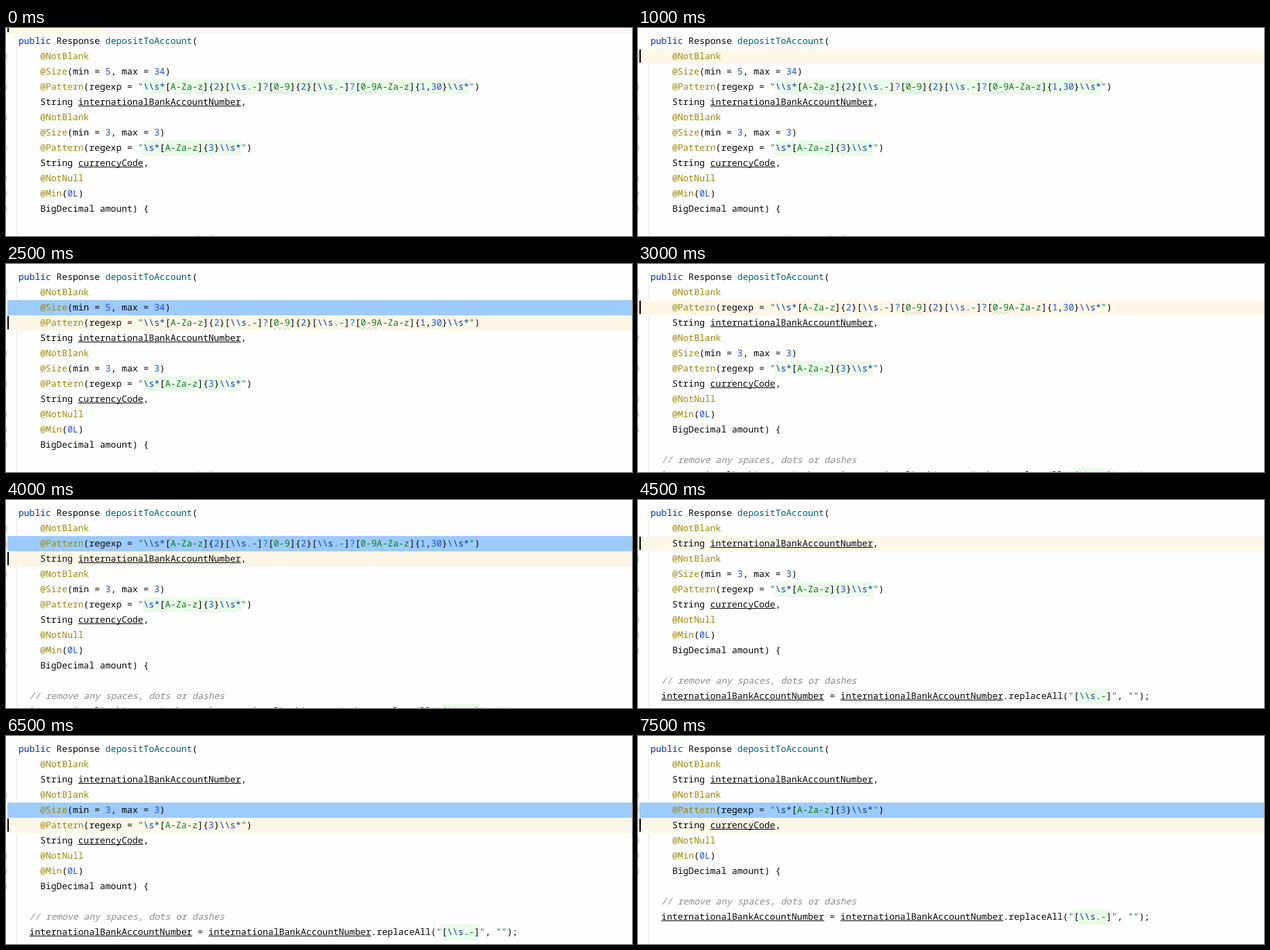
Recreate the animation shown at these times as an HTML page. Size 900 px wide and 300 px high, loop 8000 ms.

```html
<!DOCTYPE html>
<html lang="en">
<head>
<meta charset="utf-8">
<title>Code editor</title>
<style>
html, body { margin: 0; width: 100%; height: 100%; overflow: hidden; background: #fefefe; }
#stage { position: relative; width: 900px; height: 300px; overflow: hidden; }
#stage > div { position: absolute; }
#guide { left: 15px; top: 30px; width: 1px; height: 270px; background: #e6e6e6; }
#caretRow, #selection { left: 2px; width: 898px; height: 22px; }
#caretRow { background: #fcf7e9; }
#caretRow.first { background: linear-gradient(90deg, #fcfae4 138px, #fbf6f3 138px); }
#selection { background: #9dcbfc; }
#caret { left: 2px; width: 2px; height: 19px; background: #000; }
#code { left: 0; top: 8px; }
.row {
  position: relative; height: 22px; padding-left: 18px; white-space: pre; color: #080808;
  font: 13px/20px "Noto Sans Mono", "DejaVu Sans Mono", monospace;
  text-rendering: geometricPrecision;
}
.fold::before {
  content: ""; position: absolute; left: 0; top: 7px; width: 1px; height: 8px; background: #bdbdbd;
}
.keyword { color: #0033b3; }
.method { color: #00627a; }
.note { color: #9e880d; }
.number { color: #1750eb; }
.string { color: #067d17; }
.escape { color: #0037a6; font-weight: 500; }
.brace { color: #080808; }
.comment { color: #8c8c8c; font-style: italic; }
.param { text-decoration: underline 1px; text-underline-offset: 1px; text-decoration-skip-ink: none; }
.typo { text-decoration: underline wavy #c3d2bd 1px; text-underline-offset: 1px; }
.regex { display: inline-block; height: 22px; vertical-align: top; background: #ebfbea; }
.plain .regex { background: none; }
</style>
</head>
<body>
<div id="stage">
  <div id="guide"></div>
  <div id="caretRow"></div>
  <div id="selection"></div>
  <div id="code"></div>
  <div id="caret"></div>
</div>
<script>
const source = String.raw`public Response depositToAccount(
    @NotBlank
    @Size(min = 5, max = 34)
    @Pattern(regexp = "\\s*[A-Za-z]{2}[\\s.-]?[0-9]{2}[\\s.-]?[0-9A-Za-z]{1,30}\\s*")
    String internationalBankAccountNumber,
    @NotBlank
    @Size(min = 3, max = 3)
    @Pattern(regexp = "\s*[A-Za-z]{3}\\s*")
    String currencyCode,
    @NotNull
    @Min(0L)
    BigDecimal amount) {

  // remove any spaces, dots or dashes
  internationalBankAccountNumber = internationalBankAccountNumber.replaceAll("[\\s.-]", "");

  // convert to`.split("\n");

const STEP = 500;
const ROW = 22;
const TOP = 8;
const carets = [-1, 0, 1, 2, 3, 3, 2, 2, 3, 2, 3, 4, 5, 5, 4, 5];
const selecting = [4, 5, 8, 12, 13, 15];
// step at which a source line is deleted
const deletedAt = { 2: 6, 3: 9, 6: 14 };

const $ = id => document.getElementById(id);
const span = (name, text) => `<span class="${name}">${text}</span>`;

function paintRegex(text) {
  const body = text.replace(/\\+s\*?|\{[\d,]+\}|[[\]]|\?|0-9/g, m => {
    if (m[0] === "\\") return span("escape", m);
    if (m[0] === "{") return span("brace", m.replace(/\d+/g, n => span("number", n)));
    if (m === "?") return span("number", m);
    return span(m === "0-9" ? "typo" : "brace", m);
  });
  return span("string", '"' + (text && span("regex", body)) + '"');
}

function paintLine(line) {
  const token = /\/\/.*|"([^"]*)"|@\w+|\bpublic\b|depositToAccount|internationalBankAccountNumber|currencyCode|\b\d+L?\b/g;
  return line.replace(token, (m, quoted) => {
    if (quoted !== undefined) return paintRegex(quoted);
    if (m[0] === "/") return span("comment", m);
    if (m[0] === "@") return span("note", m);
    if (m === "public") return span("keyword", m);
    if (m === "depositToAccount") return span("method", m);
    return span(/^\d/.test(m) ? "number" : "param", m);
  });
}

const painted = source.map(paintLine);

function foldable(line, next = "") {
  if (/@NotBlank/.test(line)) return !/String/.test(next);
  return /^ {4}(@(?!Size)|Big)/.test(line);
}

function render(step) {
  const caret = carets[step];
  const selected = selecting.includes(step) ? caret - 1 : -9;
  const visible = source.map((_, i) => i).filter(i => !(step >= deletedAt[i]));
  $("code").innerHTML = visible.map((i, row) => {
    const fold = foldable(source[i], source[visible[row + 1]]) ? " fold" : "";
    const plain = row === caret || row === selected ? " plain" : "";
    return `<div class="row${fold}${plain}">${painted[i]}</div>`;
  }).join("");
  $("caretRow").style.top = TOP + caret * ROW + "px";
  $("caretRow").className = caret < 0 ? "first" : "";
  $("selection").style.top = TOP + selected * ROW + "px";
  $("caret").style.top = TOP + 1 + caret * ROW + "px";
}

let shown = -1;
function tick() {
  const step = Math.floor(performance.now() / STEP) % carets.length;
  if (step !== shown) render(shown = step);
  requestAnimationFrame(tick);
}
tick();
</script>
</body>
</html>
```
